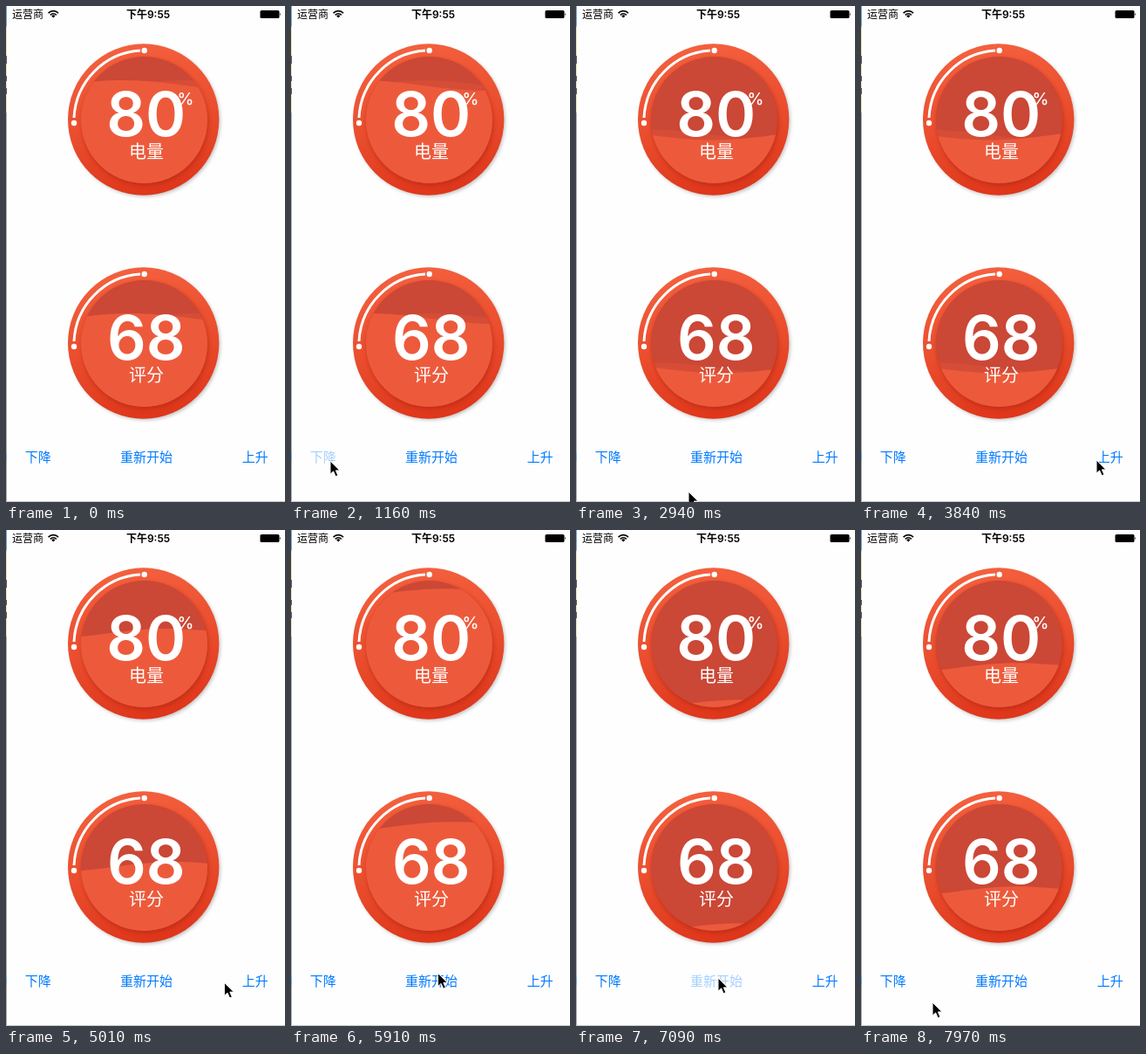
These frames come from a looping animation (320 by 568 pixels, 8 s). An HTML page:

```html
<!DOCTYPE html>
<html lang="zh-CN">
<head>
<meta charset="utf-8">
<title>电量 / 评分</title>
<style>
  html, body { margin: 0; width: 100%; height: 100%; overflow: hidden; background: #fefefe; }
  svg { display: block; width: 100%; height: 100%; }
  text { font-family: Inter, "Noto Sans CJK SC", "Noto Sans CJK", sans-serif; }
  .mid { text-anchor: middle; }
  .white { fill: #fff; }
  .big { font-size: 70px; font-weight: 600; }
  .label { font-size: 20px; }
  .btn { font-size: 15px; fill: #007aff; }
  .status { font-size: 12px; }
</style>
</head>
<body>
<svg viewBox="0 0 320 568">
  <defs>
    <linearGradient id="ring" x1="0.4" y1="0" x2="0.6" y2="1">
      <stop offset="0" stop-color="#f4603e"/>
      <stop offset="0.5" stop-color="#ea4e2e"/>
      <stop offset="1" stop-color="#de351a"/>
    </linearGradient>
    <filter id="soft" x="-20%" y="-20%" width="140%" height="140%">
      <feGaussianBlur stdDeviation="2"/>
    </filter>
    <clipPath id="bowl"><circle cx="158.5" cy="130.5" r="72.5"/></clipPath>
    <g id="dial">
      <circle cx="159.5" cy="132" r="86" fill="#000" opacity=".25" filter="url(#soft)"/>
      <circle cx="157.7" cy="130" r="86.7" fill="url(#ring)"/>
      <circle cx="159.5" cy="133" r="73" fill="#b52a12" opacity=".65" filter="url(#soft)"/>
      <circle cx="158.5" cy="130.5" r="72.5" fill="#cb4736"/>
      <path d="M78 128A81 81 0 0 1 154 51" fill="none" stroke="#fff" stroke-width="3"/>
      <circle class="white" cx="158.7" cy="51" r="3.2"/>
      <circle class="white" cx="78" cy="134" r="3.2"/>
    </g>
  </defs>

  <rect width="320" height="568" fill="#fefefe"/>
  <path d="M.5 0V568" stroke="#a9a9a9"/>
  <path d="M.5 24V122" stroke="#e4e0a8"/>
  <path d="M.5 0V22M.5 512V521" stroke="#6fa3d0"/>
  <path d="M.5 57V66M.5 80V86M.5 94V101" stroke="#555"/>
  <path d="M0 567.5H320" stroke="#c8c8c8"/>

  <text class="status" x="7" y="13.5">运营商</text>
  <g fill="none" stroke="#000" stroke-width="1.7">
    <path d="M48.6 8.1A8 8 0 0 1 60 8.1M50.8 10.3A5 5 0 0 1 57.8 10.3"/>
  </g>
  <path d="M54.3 13.6L52.2 11.4A3 3 0 0 1 56.4 11.4Z"/>
  <text class="status mid" x="163" y="13.5" font-weight="600">下午9:55</text>
  <rect x="291.5" y="5" width="22" height="9" rx="1.6"/>
  <path d="M314.3 7.8Q316 9.5 314.3 11.2Z"/>

  <g id="dials"></g>

  <text class="btn mid" x="36.7" y="521.5">下降</text>
  <text class="btn mid" x="161" y="521.5">重新开始</text>
  <text class="btn mid" x="285.7" y="521.5">上升</text>

  <path id="cursor" d="M0 0V15.2L3.6 11.9L6.2 17.8L8.9 16.6L6.4 10.9H11Z" fill="#000" stroke="#fff" stroke-width="1"/>
</svg>
<script>
const LOOP = 8000, STEP = 147.7, LAST = 54;
const RESTART = 7060;
const WAVE = { height: 6, length: 290, speed: 0.337 };

const dials = [
  { y: 0, value: '80', name: '电量', unit: '%', drop: 0, lag: 0 },
  { y: 256, value: '68', name: '评分', unit: '', drop: 11, lag: 10 }
];

// Keys are [time, value, ...]
const levelKeys = [[1250, 91], [2300, 147.5], [4460, 147.5], [5950, 70.5]];
const cursorKeys = [
  [290, 92, 575], [900, 45, 521], [2400, 45, 521], [2750, 78, 554],
  [3100, 170, 558], [3390, 254, 540], [3690, 270, 520], [4740, 270, 520],
  [5350, 226, 516], [5850, 169, 507], [6400, 163, 513], [7200, 163, 513],
  [7600, 112, 532], [7930, 82, 541]
];
const presses = [[1000, 1140], [6920, 7210], [4400, 4700]];

const cursor = document.getElementById('cursor');
const buttons = document.querySelectorAll('.btn');
const box = document.getElementById('dials');

box.innerHTML = dials.map(d => `
  <g transform="translate(0 ${d.y})">
    <use href="#dial"/>
    <g clip-path="url(#bowl)" fill="#ed5a3b">
      <path class="back" opacity=".3"/>
      <path class="front"/>
    </g>
    <text class="big white mid" x="160.8" y="149">${d.value}</text>
    <text class="white" x="196.5" y="113" font-size="19" font-weight="500">${d.unit}</text>
    <text class="label white mid" x="161" y="174">${d.name}</text>
  </g>`).join('');

const fronts = box.querySelectorAll('.front');
const backs = box.querySelectorAll('.back');

function track(keys, t) {
  if (t <= keys[0][0]) return keys[0].slice(1);
  for (let i = 1; i < keys.length; i++) {
    const a = keys[i - 1], b = keys[i];
    if (t < b[0]) {
      const p = (t - a[0]) / (b[0] - a[0]);
      return a.slice(1).map((v, j) => v + (b[j + 1] - v) * p);
    }
  }
  return keys[keys.length - 1].slice(1);
}

function wavePath(level, crest) {
  let d = 'M80 210';
  for (let x = 80; x <= 236; x += 3) {
    const y = level - WAVE.height * Math.cos((x - crest) * 2 * Math.PI / WAVE.length);
    d += `L${x} ${y.toFixed(2)}`;
  }
  return d + 'V210Z';
}

function render(t) {
  const fresh = t >= RESTART;
  const crest = 185 - WAVE.speed * (t - (fresh ? 7090 : 5010));
  const level = fresh ? 200 - 0.0477 * (t - 7090) : track(levelKeys, t)[0];
  dials.forEach((d, i) => {
    const y = level + (fresh ? 0 : d.drop);
    const x = crest + (fresh ? 0 : d.lag);
    fronts[i].setAttribute('d', wavePath(y, x));
    backs[i].setAttribute('d', wavePath(y, x + WAVE.length / 4));
  });
  buttons.forEach((b, i) => {
    const [on, off] = presses[i];
    b.setAttribute('opacity', t >= on && t < off ? 0.35 : 1);
  });
  const [x, y] = track(cursorKeys, t);
  cursor.setAttribute('transform', `translate(${x.toFixed(1)} ${y.toFixed(1)})`);
}

// The picture is held for one step at a time.
const start = performance.now();
function tick() {
  const t = (performance.now() - start) % LOOP;
  const n = Math.min(LAST, Math.floor((t + 20) / STEP));
  render(Math.max(0, n * STEP - 10));
  requestAnimationFrame(tick);
}
tick();
</script>
</body>
</html>
```
